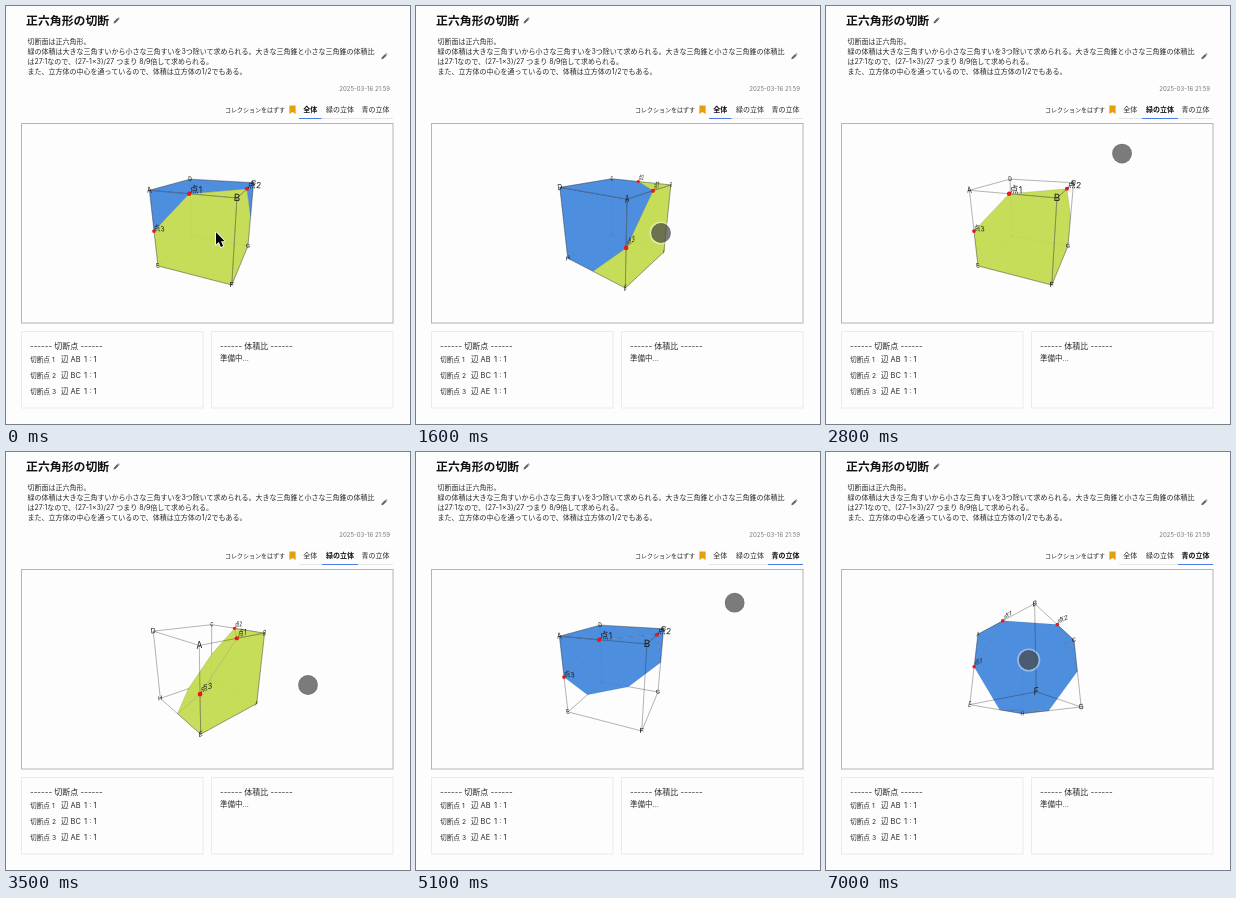
Recreate the animation shown at these times as an HTML page with a canvas. Size 404 by 418 pixels, loop 7100 ms.

```html
<!DOCTYPE html>
<html>
<head>
<meta charset="utf-8">
<title>正六角形の切断</title>
<style>
  html, body { margin: 0; width: 100%; height: 100%; overflow: hidden; background: #fdfdfd; }
  svg, canvas { position: absolute; left: 0; top: 0; width: 404px; height: 418px; }
  text { font-family: Inter, "Noto Sans CJK JP", sans-serif; font-size: 7px; fill: #2a2a2a; }
  .title { font-size: 11.9px; font-weight: 700; fill: #111; }
  .small { font-size: 6px; }
  .mid { font-size: 7.5px; }
  .head { font-size: 8px; }
  .box { fill: none; stroke: #ebebeb; }
  .on { font-weight: 700; fill: #111; }
</style>
</head>
<body>
<svg viewBox="0 0 404 418">
  <defs>
    <path id="pencil" d="M0 6L.5 4L3.9 .6L5.4 2.1L2 5.5ZM4.3 .2L4.8 -.2L6.2 1.2L5.8 1.7Z" fill="#666"/>
  </defs>
  <text class="title" x="20" y="18.6">正六角形の切断</text>
  <use href="#pencil" x="107.5" y="11.5"/>
  <g id="body"></g>
  <use href="#pencil" x="375.3" y="47.3"/>
  <text class="small" x="384" y="84.6" text-anchor="end" style="fill:#777">2025-03-16 21:59</text>
  <text class="small" x="219" y="106.3">コレクションをはずす</text>
  <path d="M283.4 99.5h6.2v8.6l-3.1-2.2l-3.1 2.2z" fill="#e3a008"/>
  <path d="M293 112.5H387" stroke="#e6e6e6"/>
  <g id="tabs"></g>
  <path id="bar" stroke="#4a7be6"/>
  <rect x="15.5" y="117.5" width="371.5" height="199.5" fill="none" stroke="#b4b4b4"/>
  <rect class="box" x="15.5" y="325.5" width="181.5" height="76.5"/>
  <rect class="box" x="205.5" y="325.5" width="181.5" height="76.5"/>
  <text class="head" x="24" y="342.6">------ 切断点 ------</text>
  <g id="rows"></g>
  <text class="head" x="214" y="342.6">------ 体積比 ------</text>
  <text class="mid" x="214" y="354.8">準備中...</text>
</svg>
<canvas></canvas>
<script>
const LOOP = 7100, FRAME = 100, SUB = 10;
const GREEN = '#c3dc51', BLUE = '#4588dd';
const CUT_EDGES = ['AB', 'BC', 'AE'];
const $ = s => document.querySelector(s);

// Page text
const lines = [
  '切断面は正六角形。',
  '緑の体積は大きな三角すいから小さな三角すいを3つ除いて求められる。大きな三角錐と小さな三角錐の体積比',
  'は27:1なので、(27-1×3)/27 つまり 8/9倍して求められる。',
  'また、立方体の中心を通っているので、体積は立方体の1/2でもある。'
];
const tabs = [
  { label: '全体', from: 293, to: 315.5, click: 0 },
  { label: '緑の立体', from: 316, to: 352, click: 2600 },
  { label: '青の立体', from: 352, to: 387, click: 5000 }
];
$('#body').innerHTML = lines.map((s, i) => `<text x="21.5" y="${37.6 + 10 * i}">${s}</text>`).join('');
$('#tabs').innerHTML = tabs.map(t =>
  `<text x="${(t.from + t.to) / 2}" y="106.3" text-anchor="middle">${t.label}</text>`).join('');
$('#rows').innerHTML = CUT_EDGES.map((edge, i) => {
  const y = 356.4 + 16 * i;
  return `<text x="24" y="${y}" style="font-size:6.7px">切断点 ${i + 1}</text>
    <text class="mid" x="55" y="${y}">辺 ${edge}</text><text class="mid" x="78" y="${y}">1 : 1</text>`;
}).join('');

// Pointer stops: time, x, y, and whether it drags on the way there
const stops = [
  [0, 209.5, 226], [400, 198.5, 227], [1600, 245, 227, true], [1900, 342.7, 225, true],
  [2200, 330, 150], [2500, 334, 108], [3300, 214, 233], [3500, 302, 233, true], [4300, 303, 233],
  [4800, 368, 113], [5600, 212, 232], [5700, 212, 232], [5900, 212, 224, true],
  [6400, 202.7, 208, true], [LOOP, 202.7, 208]
];
function pointerAt(t) {
  const i = stops.findIndex(s => s[0] > t), [a, b] = [stops[i - 1], stops[i]];
  const u = (t - a[0]) / (b[0] - a[0]), e = u * u * (3 - 2 * u);
  return { x: a[1] + (b[1] - a[1]) * e, y: a[2] + (b[2] - a[2]) * e, drag: b[3] };
}
const tabAt = t => tabs.filter(b => b.click <= t).length - 1;

// Orbit with damping: the view trails the drag; a new tab resets it
function orbit() {
  const views = [], turn = 1.8, follow = 1 - Math.exp(-SUB / 205);
  let goal, view, last = pointerAt(0), tab = -1;
  for (let t = 0; t < LOOP; t += SUB) {
    const p = pointerAt(t);
    if (tabAt(t) !== tab) {
      tab = tabAt(t);
      goal = [22, 21];
      view = [...goal];
    }
    if (p.drag) goal = [goal[0] - turn * (p.x - last.x), goal[1] + turn * (p.y - last.y)];
    view = view.map((v, k) => v + (goal[k] - v) * follow);
    last = p;
    if (t % FRAME === 0) views.push(view);
  }
  return views;
}
const views = orbit();

// Cube of side 2: A-D around the top, E-H below
const dot = (a, b) => a[0] * b[0] + a[1] * b[1] + a[2] * b[2];
const middle = ([a, b]) => a.map((x, k) => (x + b[k]) / 2);
const V = {};
[...'ABCDEFGH'].forEach((n, i) => {
  V[n] = [i % 4 % 3 ? 1 : -1, i < 4 ? 1 : -1, i % 4 < 2 ? 1 : -1];
});
const corners = Object.values(V);
const edges = corners.flatMap((a, i) => corners.slice(i + 1).filter(b => dot(a, b) === 1).map(b => [a, b]));
const faces = [0, 1, 2].flatMap(axis => [-1, 1].map(sign => {
  const at = (s, u, v) => [0, 1, 2].map(k => [s, u, v][(k - axis + 3) % 3]);
  return {
    normal: at(sign, 0, 0),
    pts: [0, 1, 2, 3].map(i => at(sign, i % 3 ? 1 : -1, i < 2 ? -1 : 1))
  };
}));
const cuts = CUT_EDGES.map(e => middle([...e].map(n => V[n])));
const cutNormal = [1, -1, 1];
const angle = p => Math.atan2(dot(p, [-1, 1, 2]), dot(p, [1, 1, 0]));
const hexagon = edges.map(middle).filter(p => dot(p, cutNormal) === 0).sort((p, q) => angle(p) - angle(q));

// Part of a polygon on one side of the cutting plane
function clip(pts, side) {
  const out = [];
  pts.forEach((p, i) => {
    const q = pts[(i + 1) % pts.length];
    const a = side * dot(p, cutNormal), b = side * dot(q, cutNormal);
    if (a >= 0) out.push(p);
    if (a * b < 0) out.push(p.map((x, k) => x + (q[k] - x) * a / (a - b)));
  });
  return out;
}

const canvas = $('canvas'), g = canvas.getContext('2d');
const ratio = window.devicePixelRatio || 1;
canvas.width = 404 * ratio;
canvas.height = 418 * ratio;
g.scale(ratio, ratio);
g.textAlign = 'center';
g.textBaseline = 'middle';
g.lineJoin = 'round';

function disc(x, y, r, color) {
  g.beginPath();
  g.arc(x, y, r, 0, 7);
  g.fillStyle = color;
  g.fill();
}

function drawCube(tab, [azimuth, elevation]) {
  const th = azimuth * Math.PI / 180, el = elevation * Math.PI / 180;
  const st = Math.sin(th), ct = Math.cos(th), s = Math.sin(el), c = Math.cos(el);
  const right = [ct, 0, -st], up = [-st * s, c, -ct * s], eye = [st * c, s, ct * c];
  const project = p => {
    const k = 183.5 / (5 - dot(p, eye));
    return [201.3 + k * dot(p, right), 217 - k * dot(p, up), k];
  };
  const trace = pts => {
    g.beginPath();
    pts.forEach(p => {
      const [x, y] = project(p);
      g.lineTo(x, y);
    });
  };
  const fill = (pts, color) => {
    trace(pts);
    g.closePath();
    g.fillStyle = color;
    g.globalAlpha = .95;
    g.fill();
    g.globalAlpha = 1;
    g.strokeStyle = 'rgba(0,0,0,.2)';
    g.lineWidth = .5;
    g.stroke();
  };
  const visible = f => 5 * dot(f.normal, eye) > 1;
  const inFront = p => faces.some(f => visible(f) && dot(f.normal, p) > .99);

  // Labels lie flat in the plane z = const
  const label = (text, [x, y, z]) => {
    const d = .019, o = project([x, y, z]), i = project([x + d, y, z]), j = project([x, y - d, z]);
    g.save();
    g.transform(i[0] - o[0], i[1] - o[1], j[0] - o[0], j[1] - o[1], o[0], o[1]);
    g.font = '10px Inter, "Noto Sans CJK JP", sans-serif';
    g.fillStyle = '#1a1a1a';
    g.fillText(text, 0, 0);
    g.restore();
  };
  const frame = front => {
    const here = p => inFront(p) === front;
    g.strokeStyle = 'rgba(30,30,30,.6)';
    g.lineWidth = .55;
    edges.filter(e => here(middle(e))).forEach(e => {
      trace(e);
      g.stroke();
    });
    cuts.filter(here).forEach(p => {
      const [x, y, k] = project(p);
      disc(x, y, .046 * k, '#f01414');
    });
    Object.keys(V).filter(n => here(V[n])).forEach(n => label(n, V[n]));
    cuts.forEach((p, i) => here(p) && label('点' + (i + 1), [p[0] + .16, p[1] + .09, p[2]]));
  };

  frame(false);
  [{ side: 1, color: GREEN, hiddenOn: 2 }, { side: -1, color: BLUE, hiddenOn: 1 }].forEach(solid => {
    if (tab === solid.hiddenOn) return;
    faces.filter(visible).forEach(f => fill(clip(f.pts, solid.side), solid.color));
    if (tab && solid.side * dot(cutNormal, eye) < 0) fill(hexagon, solid.color);
  });
  frame(true);
}

const arrow = new Path2D('M.5 .3V12.6L3.3 10L5.4 14.9L7.6 14L5.5 9.2H9.2Z');
function drawPointer(t) {
  const { x, y } = pointerAt(t);
  if (t < 200) {
    g.save();
    g.translate(x, y);
    g.strokeStyle = '#fff';
    g.lineWidth = 1.6;
    g.stroke(arrow);
    g.fillStyle = '#000';
    g.fill(arrow);
    g.restore();
    return;
  }
  disc(x, y, 11.6, 'rgba(255,255,255,.4)');
  disc(x, y, 9.9, 'rgba(0,0,0,.54)');
  disc(x, y, 9, 'rgba(255,255,255,.04)');
}

function render(ms) {
  const t = Math.floor(ms % LOOP / FRAME) * FRAME, tab = tabAt(t);
  $('#bar').setAttribute('d', `M${tabs[tab].from} 112.5H${tabs[tab].to}`);
  [...$('#tabs').children].forEach((el, i) => el.classList.toggle('on', i === tab));
  g.clearRect(0, 0, 404, 418);
  drawCube(tab, views[t / FRAME]);
  drawPointer(t);
}

const start = performance.now();
function tick() {
  render(performance.now() - start);
  requestAnimationFrame(tick);
}
tick();
</script>
</body>
</html>
```
